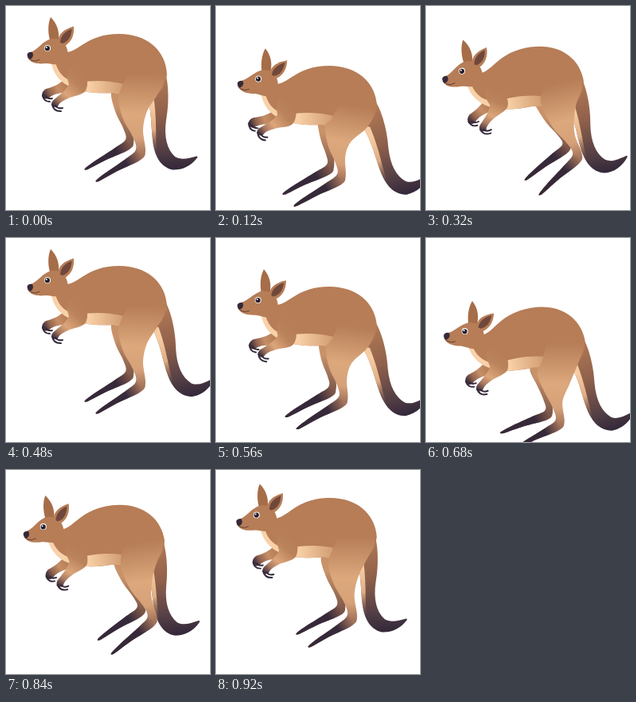
Write an HTML page that moves like this. It is 256 px wide and 256 px high and loops after 0.96 s.

```html
<!DOCTYPE html>
<html lang="en">
<head>
<meta charset="utf-8">
<title>Hopping kangaroo</title>
<style>
html, body { margin: 0; width: 100%; height: 100%; overflow: hidden; background: #fff; }
svg { display: block; width: 100vw; height: 100vh; }
</style>
</head>
<body>
<svg viewBox="0 0 256 256">
  <defs>
    <linearGradient id="tailFill" gradientUnits="userSpaceOnUse" x1="196" y1="80" x2="206" y2="204">
      <stop offset="0" stop-color="#b67d57"/><stop offset=".45" stop-color="#8f604b"/>
      <stop offset=".8" stop-color="#554046"/><stop offset="1" stop-color="#35293a"/>
    </linearGradient>
    <linearGradient id="tailLight" gradientUnits="userSpaceOnUse" x1="0" y1="125" x2="0" y2="186">
      <stop offset="0" stop-color="#f6cca3"/><stop offset=".5" stop-color="#e0ad83"/>
      <stop offset="1" stop-color="#8f604b" stop-opacity="0"/>
    </linearGradient>
    <linearGradient id="bellyFill" gradientUnits="userSpaceOnUse" x1="60" y1="0" x2="148" y2="0">
      <stop offset="0" stop-color="#f9d2aa"/><stop offset=".5" stop-color="#f8cfa6"/><stop offset="1" stop-color="#d09b70"/>
    </linearGradient>
    <linearGradient id="armFill" gradientUnits="userSpaceOnUse" x1="96" y1="86" x2="58" y2="127">
      <stop offset="0" stop-color="#b67d57"/><stop offset=".25" stop-color="#bb835b"/><stop offset=".58" stop-color="#dca67b"/>
      <stop offset=".78" stop-color="#a8785f"/><stop offset=".97" stop-color="#35293a"/>
    </linearGradient>
    <linearGradient id="farArmFill" gradientUnits="userSpaceOnUse" x1="80" y1="96" x2="45" y2="112">
      <stop offset="0" stop-color="#b0764f"/><stop offset=".45" stop-color="#c58e66"/>
      <stop offset=".72" stop-color="#936650"/><stop offset=".97" stop-color="#35293a"/>
    </linearGradient>
    <linearGradient id="farLegFill" gradientUnits="userSpaceOnUse">
      <stop offset="0" stop-color="#c58c62"/><stop offset=".5" stop-color="#c9936a"/><stop offset="1" stop-color="#7d5749"/>
    </linearGradient>
    <linearGradient id="legFill" gradientUnits="userSpaceOnUse">
      <stop offset="0" stop-color="#b67d57"/><stop offset=".5" stop-color="#dca87c"/>
      <stop offset=".8" stop-color="#d6a178"/><stop offset="1" stop-color="#a4745c"/>
    </linearGradient>
    <linearGradient id="farFootFill" gradientUnits="userSpaceOnUse">
      <stop offset="0" stop-color="#35293a" stop-opacity="0"/><stop offset=".3" stop-color="#35293a"/>
    </linearGradient>
    <linearGradient id="footFill" gradientUnits="userSpaceOnUse">
      <stop offset="0" stop-color="#35293a" stop-opacity="0"/><stop offset=".33" stop-color="#35293a"/>
    </linearGradient>
  </defs>

  <g id="tail">
    <path fill="url(#tailFill)" d="M180 62L196 74C205 90 205 122 201 143C198 164 202 180 212 189C220 194 229 191 239 188.5Q241 188.5 240 190.5C231 202 220 206 209 205.5C193 202 186 187 184 168C182 150 183 132 176 108Z"/>
    <path fill="url(#tailLight)" d="M176 108C183 132 182 150 184 168C185 176 187 183 190 189C187 168 190 145 185 112Z"/>
  </g>
  <g id="farArm">
    <path fill="url(#farArmFill)" d="M70 84L88 92L87 106C78 108 68 109 61 111Q56 113 53 116Q47 118 45 113Q45 107 50 104C58 102 67 98 72 93Z"/>
    <path fill="none" stroke="#35293a" stroke-width="1.9" stroke-linecap="round" d="M46 112Q47 120 55 120M50 113Q52 117 58 116"/>
  </g>
  <path id="farLeg" fill="url(#farLegFill)"/>
  <path id="farFoot" fill="url(#farFootFill)"/>
  <g id="body">
    <path fill="#b67d57" d="M66 50L76 58C92 57 102 35 142 35C177 35 201 56 202 86C200 102 190 114 178 119C166 120 154 111 133 109C118 110 98 109 84 103C68 96 59 84 57 68Z"/>
    <path fill="url(#bellyFill)" d="M56 67C58 84 68 97 84 103C98 109 117 110 133 109L150 112L148 98C128 93 108 93 92 96C76 95 66 86 62 71Z"/>
  </g>
  <path id="leg" fill="url(#legFill)"/>
  <path id="foot" fill="url(#footFill)"/>
  <g id="head">
    <path fill="#a66d49" d="M55 43C52 31 53 21 56 14C64 22 67 31 66 42Z"/>
    <path fill="#b67d57" d="M52 43C59 39 69 41 74 48C79 56 79 66 73 71C66 76 57 72 50 72C42 73 34 72 31 69C26 66 26 60 31 58C39 55 44 47 52 43Z"/>
    <path fill="#b67d57" d="M65 46C65 35 73 29 85 25.5C86 37 82 46 72 51Z"/>
    <path fill="#70483b" d="M68 46C68 38 74 32 82.5 28.5C82 38 79 44 71 47Z"/>
    <path fill="#35293a" d="M33 58Q28 57 26.5 61Q27 66 30 67Q34 65 34 61Z"/>
    <path fill="none" stroke="#5c3a33" stroke-width=".9" stroke-linecap="round" d="M31 68Q37 70.5 42 67.5"/>
    <circle cx="52" cy="53" r="4" fill="#fff"/>
    <circle cx="51.9" cy="53.2" r="3.1" fill="#251d29"/>
    <circle cx="50.8" cy="52.1" r="1" fill="#fff"/>
  </g>
  <g id="arm">
    <path fill="url(#armFill)" d="M80 76C75 84 77 92 79 98C75 106 68 111 62 116Q57 119 57 124Q60 129 65 126C67 121 73 118 80 115C89 112 97 111 100 106C104 98 102 88 98 80Z"/>
    <path fill="none" stroke="#35293a" stroke-width="2" stroke-linecap="round" d="M58 124Q60 132.5 69 132M62 125Q65 129.5 71 128"/>
  </g>
</svg>
<script>
const LOOP = 960, HOP = 480, STEP = 40;
const $ = id => document.getElementById(id);

// time, dx, dy, lean, head, arm, knee xy, heel xy, toe xy
const hop = [
  [0, 0, 0, 0, 0, 0, 158, 125, 169, 186, 113, 220],
  [120, 0, 40, 0, 7, 9, 152, 161, 157, 217, 98, 251],
  [200, -1, 52, 10, 8, -10, 159, 177, 168, 234, 112, 264],
  [280, -3, 25, 11.5, -6, -22, 169, 147, 195, 200, 152, 245],
  [320, -3, 16, 8.5, -4, -18, 167, 137, 191, 190, 142, 237],
  [440, 0, 0, 2.5, 0, -2, 159, 126, 171, 188, 116, 222]
];
const tailSwing = [[0, 0], [120, 14], [200, 13], [280, 9], [320, 9.5], [480, 11],
  [600, 14], [680, 13], [760, 9], [920, 0]];

// Periodic monotone cubic interpolation of one column
function sample(keys, col, t, period) {
  const n = keys.length;
  const at = i => {
    const turn = Math.floor(i / n), k = keys[i - turn * n];
    return [k[0] + turn * period, k[col]];
  };
  const slope = i => {
    const [t0, a] = at(i), [t1, b] = at(i + 1);
    return (b - a) / (t1 - t0);
  };
  const tangent = i => {
    const p = slope(i - 1), q = slope(i);
    return p * q > 0 ? 2 * p * q / (p + q) : 0;
  };
  let i = 0;
  while (i < n - 1 && keys[i + 1][0] <= t) i++;
  const [t0, a] = at(i), [t1, b] = at(i + 1), h = t1 - t0, u = (t - t0) / h;
  const v = 1 - u;
  return v * v * (1 + 2 * u) * a + u * u * (3 - 2 * u) * b
    + u * v * h * (v * tangent(i) - u * tangent(i + 1));
}

const add = (p, x, y) => [p[0] + x, p[1] + y];

// Similarity transform that carries segment a-b onto c-d
function bone(a, b, c, d) {
  const x = b[0] - a[0], y = b[1] - a[1], u = d[0] - c[0], v = d[1] - c[1];
  const l = x * x + y * y, re = (u * x + v * y) / l, im = (v * x - u * y) / l;
  return p => {
    const px = p[0] - a[0], py = p[1] - a[1];
    return [c[0] + px * re - py * im, c[1] + px * im + py * re];
  };
}

function smooth(pts) {
  const n = pts.length, f = p => p[0].toFixed(2) + ' ' + p[1].toFixed(2);
  let d = 'M' + f(pts[0]);
  for (let i = 0; i < n; i++) {
    const [a, b, c, e] = [n - 1, 0, 1, 2].map(k => pts[(i + k) % n]);
    const c1 = [b[0] + (c[0] - a[0]) / 6, b[1] + (c[1] - a[1]) / 6];
    const c2 = [c[0] - (e[0] - b[0]) / 6, c[1] - (e[1] - b[1]) / 6];
    d += 'C' + [c1, c2, c].map(f).join(' ');
  }
  return d + 'Z';
}

const HIP = [172, 85], KNEE = [158, 125], HEEL = [169, 186], TOE = [113, 220];
// Outline points grouped by the bone they follow
const outline = [
  ['body', [165, 74], [152, 88], [145, 102]],
  ['thigh', [141, 117]],
  ['shank', [147, 142], [159, 164], [163, 180]],
  ['foot', [150, 192], [124, 210], [113, 219], [115, 220.5], [122, 217], [140, 207], [169, 193]],
  ['shank', [175, 182], [172, 155]],
  ['thigh', [177, 132]],
  ['body', [189, 113], [198, 96], [199, 80], [188, 72]]
];

function setGradient(id, a, b) {
  const g = $(id);
  [['x1', a[0]], ['y1', a[1]], ['x2', b[0]], ['y2', b[1]]].forEach(([k, v]) => g.setAttribute(k, v));
}

function drawLeg(leg, foot, onBody, hip, knee, heel, toe) {
  const maps = {
    body: onBody,
    thigh: bone(HIP, KNEE, hip, knee),
    shank: bone(KNEE, HEEL, knee, heel),
    foot: bone(HEEL, TOE, heel, toe)
  };
  const d = smooth(outline.flatMap(([name, ...pts]) => pts.map(maps[name])));
  $(leg).setAttribute('d', d);
  $(foot).setAttribute('d', d);
  setGradient(leg + 'Fill', hip, heel);
  setGradient(foot + 'Fill', heel, toe);
}

function draw(time) {
  const t = Math.floor(time % LOOP / STEP) * STEP;
  const [dx, dy, lean, head, arm, kx, ky, hx, hy, tx, ty] =
    hop[0].slice(1).map((_, i) => sample(hop, i + 1, t % HOP, HOP));
  const swing = sample(tailSwing, 1, t, LOOP);

  const base = `translate(${dx} ${dy}) rotate(${-lean} 142 90)`;
  const pose = (id, turn, x, y) =>
    $(id).setAttribute('transform', `${base} rotate(${turn + lean} ${x} ${y})`);
  $('body').setAttribute('transform', base);
  pose('tail', -swing, 188, 78);
  pose('head', head, 65, 62);
  pose('arm', arm, 88, 85);
  pose('farArm', arm, 72, 80);

  const c = Math.cos(lean * Math.PI / 180), s = Math.sin(lean * Math.PI / 180);
  const onBody = ([x, y]) => [
    142 + dx + (x - 142) * c + (y - 90) * s,
    90 + dy - (x - 142) * s + (y - 90) * c
  ];
  const hip = onBody(HIP), knee = [kx, ky], heel = [hx, hy], toe = [tx, ty];
  const off = -14 - lean * .45;
  drawLeg('leg', 'foot', onBody, hip, knee, heel, toe);
  drawLeg('farLeg', 'farFoot', p => add(onBody(p), -10, -3),
    add(hip, -10, -3), add(knee, -10, -5), add(heel, -14, -13), add(toe, off, off - 1));
}

const start = performance.now();
function tick() {
  draw(performance.now() - start);
  requestAnimationFrame(tick);
}
tick();
</script>
</body>
</html>
```
